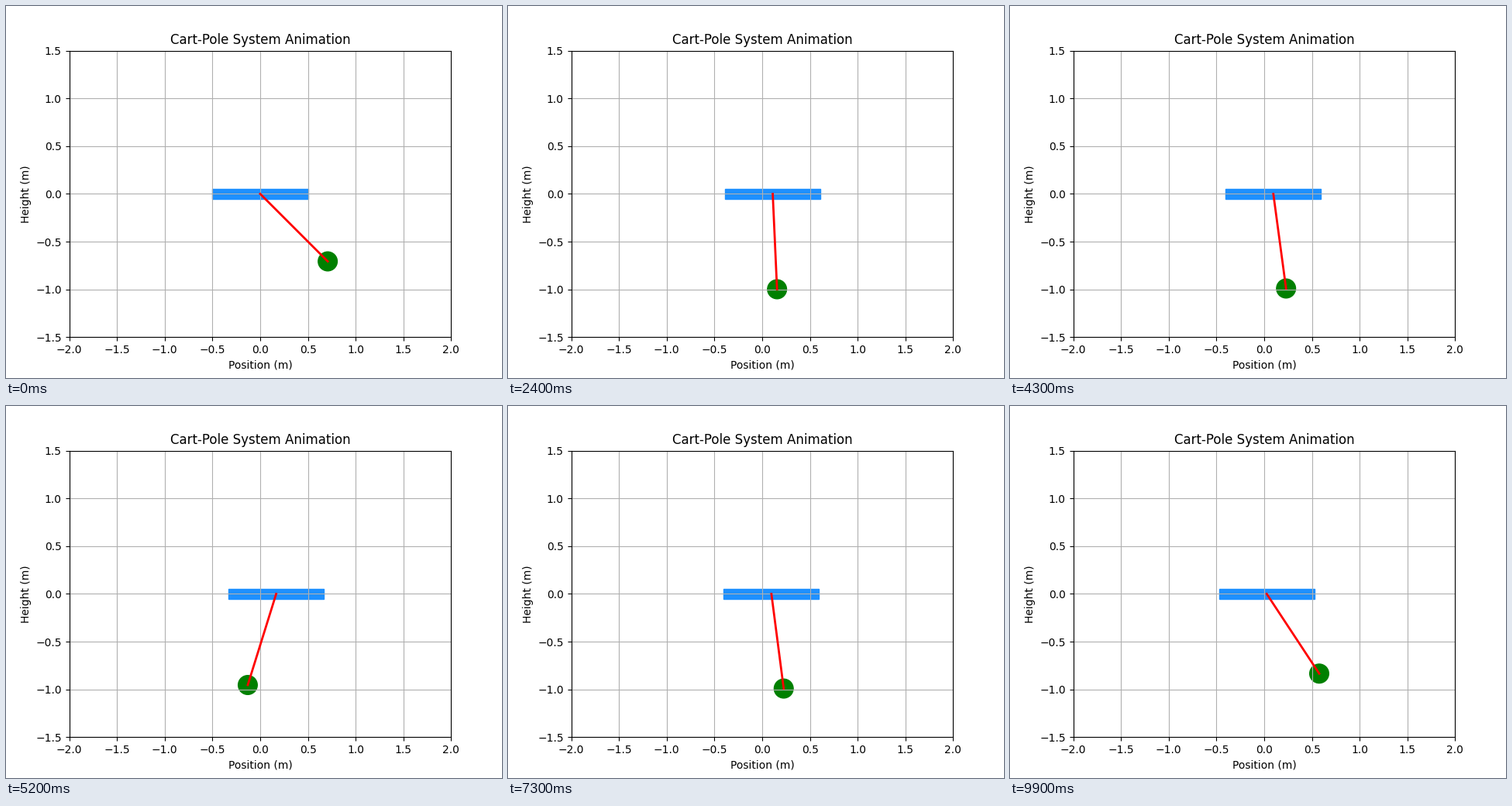
Animation of 640x480 px, one loop 10000 ms. Source, as a matplotlib script:

```python
import numpy as np
import matplotlib.pyplot as plt
from matplotlib.animation import FuncAnimation
from matplotlib.patches import Circle, Rectangle

FRAMES = 100
DURATION = 10.0
SUBSTEPS = 20

GRAVITY = 9.82
CART_MASS = 0.5
BOB_MASS = 0.1
LENGTH = 1.0
START_ANGLE = np.pi / 4
CART_W, CART_H = 1.0, 0.1

RATIO = BOB_MASS / (CART_MASS + BOB_MASS)


def derivative(state):
    """Frictionless pole on a free cart; the angle is measured from straight down."""
    angle, speed = state
    s, c = np.sin(angle), np.cos(angle)
    accel = -(GRAVITY / LENGTH * s + RATIO * speed**2 * s * c) / (1 - RATIO * c**2)
    return np.array([speed, accel])


def rk4_step(state, h):
    k1 = derivative(state)
    k2 = derivative(state + h / 2 * k1)
    k3 = derivative(state + h / 2 * k2)
    k4 = derivative(state + h * k3)
    return state + h / 6 * (k1 + 2 * k2 + 2 * k3 + k4)


def simulate():
    h = DURATION / (FRAMES - 1) / SUBSTEPS
    state = np.array([START_ANGLE, 0.0])
    angles = [START_ANGLE]
    for _ in range(FRAMES - 1):
        for _ in range(SUBSTEPS):
            state = rk4_step(state, h)
        angles.append(state[0])
    return np.array(angles)


angles = simulate()
# The centre of mass stays put, so the cart position follows from the angle.
cart_x = RATIO * LENGTH * (np.sin(START_ANGLE) - np.sin(angles))
bob_x = cart_x + LENGTH * np.sin(angles)
bob_y = -LENGTH * np.cos(angles)

fig, ax = plt.subplots(figsize=(6.4, 4.8), dpi=100)
ax.set_xlim(-2, 2)
ax.set_ylim(-1.5, 1.5)
ax.set_aspect("equal")
ax.grid(True)
ax.set_title("Cart-Pole System Animation")
ax.set_xlabel("Position (m)")
ax.set_ylabel("Height (m)")

cart = ax.add_patch(Rectangle((-CART_W / 2, -CART_H / 2), CART_W, CART_H,
                              color="dodgerblue"))
bob = ax.add_patch(Circle((bob_x[0], bob_y[0]), 0.1, color="green"))
pole, = ax.plot([], [], color="red", lw=2)


def update(i):
    cart.set_x(cart_x[i] - CART_W / 2)
    bob.center = bob_x[i], bob_y[i]
    pole.set_data([cart_x[i], bob_x[i]], [0, bob_y[i]])
    return cart, bob, pole


anim = FuncAnimation(fig, update, frames=FRAMES, interval=100,
                     repeat=True, repeat_delay=0)
plt.show()
```
